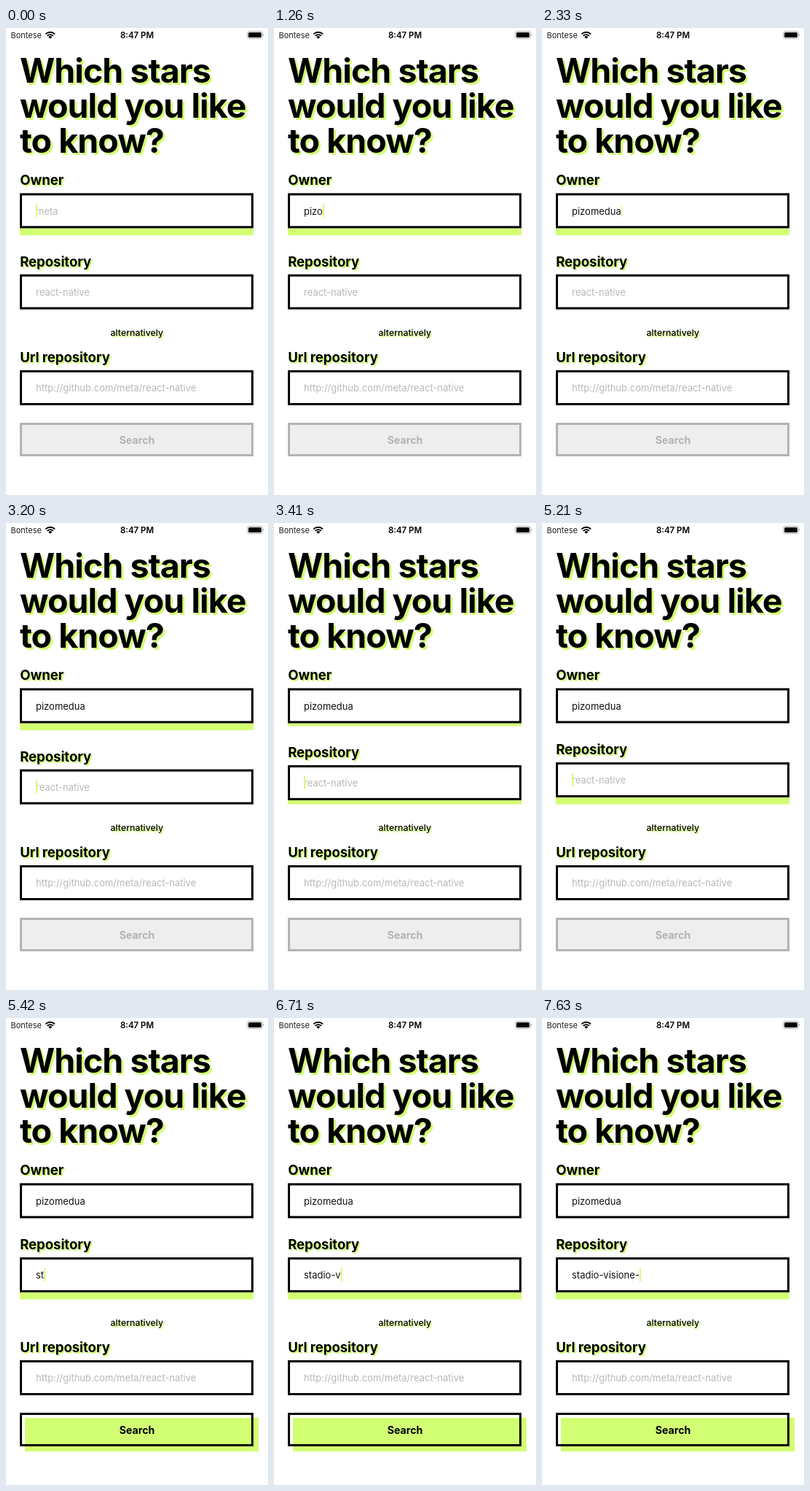
Write an HTML page that moves like this. It is 360 by 640 pixels and loops after 8 s.

```html
<!DOCTYPE html>
<html lang="en">
<head>
<meta charset="utf-8">
<title>Star search form</title>
<style>
  html, body { margin: 0; width: 100%; height: 100%; overflow: hidden; background: #fff; }
  svg { display: block; width: 360px; height: 640px; }
  text { font-family: Inter, "Liberation Sans", sans-serif; font-optical-sizing: none; white-space: pre; }
  .title { font-size: 46.5px; font-weight: 700; letter-spacing: -.95px; }
  .label { font-size: 18.6px; font-weight: 700; letter-spacing: -.08px; }
  .input { font-size: 13px; }
  .note { font-size: 12.3px; font-weight: 500; text-anchor: middle; }
  .button { font-size: 14.2px; font-weight: 700; text-anchor: middle; }
  .carrier { font-size: 11px; }
  .clock { font-size: 11.5px; font-weight: 600; text-anchor: middle; }
</style>
</head>
<body>
<svg id="stage" viewBox="0 0 360 640" xmlns="http://www.w3.org/2000/svg"></svg>
<script>
const LOOP = 8000;
const LIME = '#d2fe73', HINT = '#b8b8b8', DISABLED = '#b3b3b3';
const BAR = 9.6, LEFT = 19, WIDTH = 321, FIELD_HEIGHT = 48, TEXT_X = 41;
const stage = document.getElementById('stage');

function add(tag, attrs, parent = stage) {
  const node = document.createElementNS('http://www.w3.org/2000/svg', tag);
  set(node, attrs);
  return parent.appendChild(node);
}

function set(node, attrs) {
  for (const key in attrs) node.setAttribute(key, attrs[key]);
}

function write(content, x, y, style, parent, fill = '#000') {
  const node = add('text', { x, y, class: style, fill }, parent);
  node.textContent = content;
  return node;
}

function writeShadowed(content, x, y, style, offset, parent) {
  write(content, x + offset, y + offset, style, parent, LIME);
  write(content, x, y, style, parent);
}

function outline(y, height, parent, fill = '#fff') {
  return add('rect', {
    x: LEFT + 1.5, y: y + 1.5, width: WIDTH - 3, height: height - 3,
    fill, stroke: '#000', 'stroke-width': 3
  }, parent);
}

// Field parts are placed relative to the top edge of the box.
function makeField(label, hint) {
  const group = add('g', {});
  writeShadowed(label, 19.2, -11, 'label', 2, group);
  const bar = add('rect', { x: LEFT, y: FIELD_HEIGHT, width: WIDTH, height: 0, fill: LIME }, group);
  outline(0, FIELD_HEIGHT, group);
  const text = write(hint, TEXT_X, 29.2, 'input', group, HINT);
  const caret = add('rect', { y: 15, width: 2, height: 18, fill: LIME }, group);
  return { group, bar, text, caret, hint };
}

function updateField(field, top, value, barHeight, caretAlpha) {
  set(field.group, { transform: `translate(0 ${top})` });
  set(field.bar, { height: barHeight });
  field.text.textContent = value || field.hint;
  set(field.text, { fill: value ? '#111' : HINT });
  const caretX = TEXT_X + (value ? field.text.getComputedTextLength() : 0);
  set(field.caret, { x: caretX, opacity: caretAlpha });
}

function drawStatusBar() {
  write('Bontese', 6.5, 14, 'carrier', stage, '#222');
  write('8:47 PM', 180, 14, 'clock');
  add('path', { d: 'M60.8 14.8L58.3 12.3A3.5 3.5 0 0 1 63.3 12.3Z' });
  for (const radius of [5.7, 9]) {
    const d = radius * Math.SQRT1_2;
    add('path', {
      d: `M${60.8 - d} ${14.8 - d}A${radius} ${radius} 0 0 1 ${60.8 + d} ${14.8 - d}`,
      fill: 'none', stroke: '#000', 'stroke-width': 1.9
    });
  }
  add('rect', { x: 331.5, y: 4.5, width: 21, height: 10, rx: 2.8, fill: 'none', stroke: '#aaa' });
  add('rect', { x: 333, y: 6, width: 18, height: 7, rx: 1.6 });
  add('path', { d: 'M353.3 8A1.6 1.6 0 0 1 353.3 11Z', fill: '#aaa' });
}

drawStatusBar();
['Which stars', 'would you like', 'to know?'].forEach((line, i) =>
  writeShadowed(line, 19, 75 + 48 * i, 'title', 3));
const owner = makeField('Owner', 'meta');
const repository = makeField('Repository', 'react-native');
const url = makeField('Url repository', 'http://github.com/meta/react-native');
writeShadowed('alternatively', 179.8, 421.6, 'note', 2);

const buttonShadow = add('rect', { x: 26, y: 548, width: WIDTH, height: 46, fill: LIME });
const buttonBox = outline(541, 46);
const buttonText = write('Search', 180, 569.6, 'button');

const OWNER_NAME = 'pizomedua', REPOSITORY_NAME = 'stadio-visione-';
// Each step: start time and the value that holds until the next one.
const ownerTyping = [[960, 1], [1100, 2], [1260, 4], [1410, 6], [1590, 7], [1700, 8], [1810, 9]];
const repositoryTyping = [
  [5420, 2], [5540, 3], [5660, 4], [5820, 5], [6070, 7], [6710, 8], [6820, 9],
  [6930, 10], [7100, 11], [7215, 12], [7330, 13], [7480, 14], [7630, 15]
];
const ownerBar = [[0, BAR], [3305, 7.8], [3410, 3.9], [3720, 0]];
const blinks = [360, 2330, 3720, 4730, 6570];
const FOCUS_CHANGE = 3200, BUTTON_ENABLED = 5420, TYPING_RESUMES = 6710;

function valueAt(steps, t) {
  return steps.reduce((value, [start, next]) => t >= start ? next : value, 0);
}

function caretAt(t) {
  if (t < blinks[0] || t >= TYPING_RESUMES) return 1;
  const age = t - blinks.filter(start => start <= t).pop();
  if (age < 120 || (age >= 360 && age < 480)) return .5;
  return age < 360 ? 0 : 1;
}

function render(t) {
  const ownerHeight = valueAt(ownerBar, t);
  const ownerFocused = t < FOCUS_CHANGE;
  const caret = caretAt(t);
  updateField(owner, 226.4, OWNER_NAME.slice(0, valueAt(ownerTyping, t)),
    ownerHeight, ownerFocused ? caret : 0);
  updateField(repository, 328 + ownerHeight, REPOSITORY_NAME.slice(0, valueAt(repositoryTyping, t)),
    BAR - ownerHeight, ownerFocused ? 0 : caret);
  updateField(url, 469, '', 0, 0);

  const enabled = t >= BUTTON_ENABLED;
  set(buttonShadow, { opacity: enabled ? 1 : 0 });
  set(buttonBox, { fill: enabled ? 'none' : '#eeeeee', stroke: enabled ? '#000' : DISABLED });
  set(buttonText, { fill: enabled ? '#000' : DISABLED });
}

const startTime = performance.now();
function tick() {
  render((performance.now() - startTime) % LOOP);
  requestAnimationFrame(tick);
}
tick();
</script>
</body>
</html>
```
